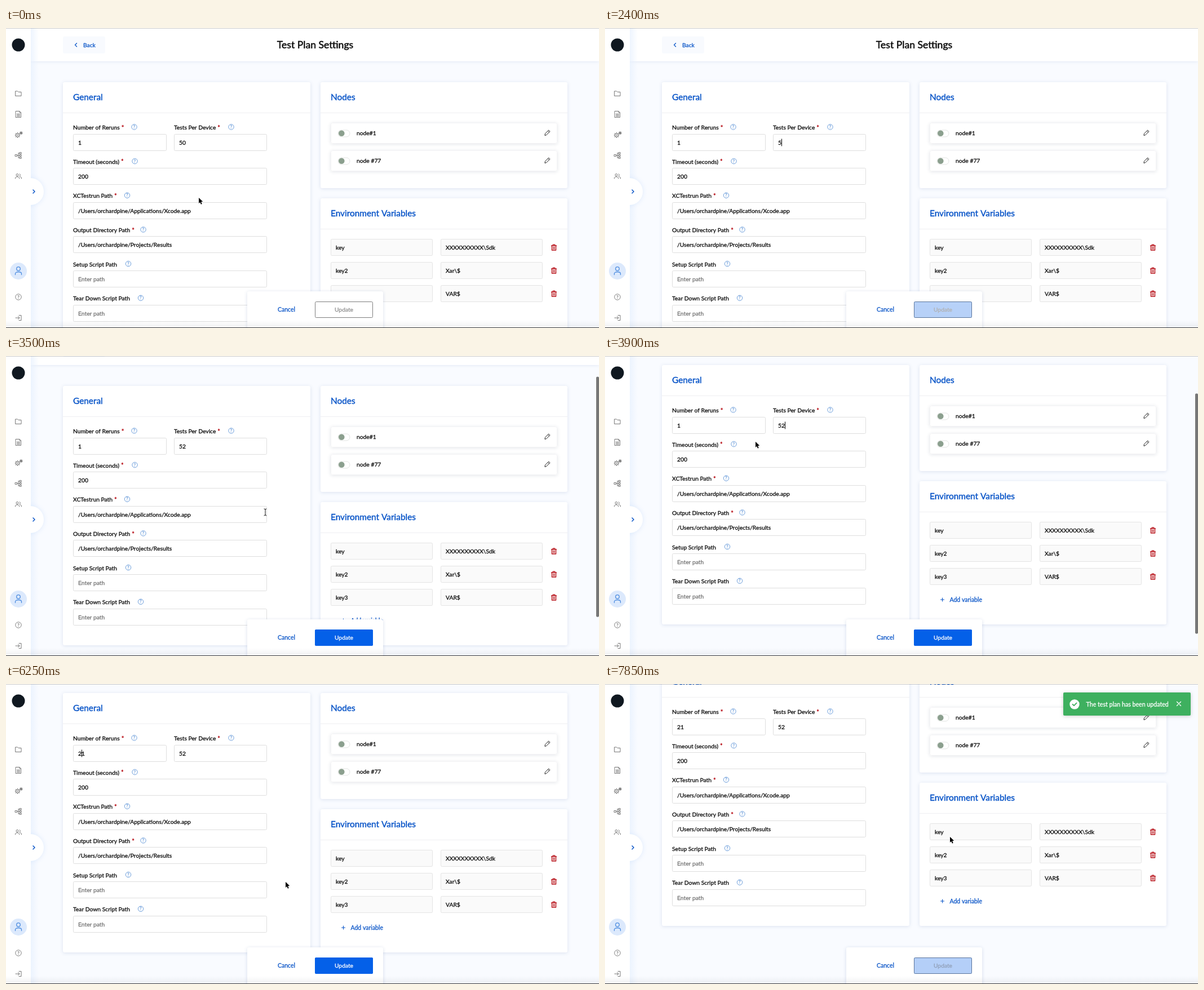
An HTML page with a canvas that plays this animation: 1052 px wide and 532 px high, repeating every 7900 ms.

```html
<!DOCTYPE html>
<html lang="en">
<head>
<meta charset="utf-8">
<title>Test Plan Settings</title>
<style>
  html, body { margin: 0; width: 100%; height: 100%; overflow: hidden; background: #f9fbff; }
  canvas { display: block; width: 1052px; height: 532px; }
</style>
</head>
<body>
<canvas id="stage"></canvas>
<script>
const W = 1052, H = 532, LOOP = 7900;
const canvas = document.getElementById('stage');
const ctx = canvas.getContext('2d');
const dpr = window.devicePixelRatio || 1;
canvas.width = W * dpr;
canvas.height = H * dpr;

const FONT = 'Lato, "Open Sans", sans-serif';
const BLUE = '#0b56c8', INK = '#0c0c0c', RED = '#b8141c', GREY = '#777';
const BODY = 10.3;

const clamp = v => Math.max(0, Math.min(1, v));
const ramp = (t, a, b) => clamp((t - a) / (b - a));
const ease = p => p * p * (3 - 2 * p);
const lerp = (a, b, p) => a + (b - a) * p;
const between = (t, a, b) => t >= a && t < b;

function mix(a, b, p) {
  return `rgb(${a.map((v, i) => Math.round(lerp(v, b[i], p))).join(',')})`;
}

// Drawing helpers
function box(x, y, w, h, r, fill, stroke, shadow) {
  ctx.save();
  ctx.beginPath();
  ctx.roundRect(x, y, w, h, r);
  if (shadow) {
    ctx.shadowColor = shadow;
    ctx.shadowBlur = 6 * dpr;
    ctx.shadowOffsetY = dpr;
  }
  if (fill) { ctx.fillStyle = fill; ctx.fill(); }
  ctx.restore();
  if (stroke) {
    ctx.lineWidth = 1;
    ctx.strokeStyle = stroke;
    ctx.beginPath();
    ctx.roundRect(x + .5, y + .5, w - 1, h - 1, r);
    ctx.stroke();
  }
}

function disc(x, y, r, fill, stroke, width = 1) {
  ctx.beginPath();
  ctx.arc(x, y, r, 0, 7);
  if (fill) { ctx.fillStyle = fill; ctx.fill(); }
  if (stroke) { ctx.lineWidth = width; ctx.strokeStyle = stroke; ctx.stroke(); }
}

// y is the middle of the capitals; a hairline stroke gives a medium weight
function text(s, x, y, color = INK, size = BODY, align = 'left') {
  ctx.font = `${size}px ${FONT}`;
  ctx.textAlign = align;
  ctx.fillStyle = ctx.strokeStyle = color;
  ctx.lineWidth = size * .028;
  ctx.lineJoin = 'round';
  ctx.fillText(s, x, y + size * .34);
  ctx.strokeText(s, x, y + size * .34);
  return ctx.measureText(s).width;
}

function icon(d, x, y, stroke, width = 1, fill) {
  const path = new Path2D(d);
  ctx.save();
  ctx.translate(x, y);
  ctx.lineJoin = ctx.lineCap = 'round';
  if (fill) { ctx.fillStyle = fill; ctx.fill(path); }
  if (stroke) { ctx.strokeStyle = stroke; ctx.lineWidth = width; ctx.stroke(path); }
  ctx.restore();
}

function rule(x, y, w, color) {
  ctx.fillStyle = color;
  ctx.fillRect(x, y, w, 1);
}

const ICONS = {
  folder: 'M-5-4H-1.5L0-2.5H5V4.5H-5Z',
  doc: 'M-4.5-5.5H2L4.5-3V5.5H-4.5ZM2-5.5V-3H4.5M-2.5-.5H2.5M-2.5 1.5H2.5M-2.5 3.5H2.5',
  tree: 'M-5.5-1.5H-2.5V1.5H-5.5ZM-2.5 0H2.5M0-4V4M0-4H2.5M0 4H2.5M2.5-5.3H5.2V-2.8H2.5ZM2.5-1.2H5.2V1.2H2.5ZM2.5 2.8H5.2V5.3H2.5Z',
  people: 'M-5.5 4V3C-5.5.2 1.5.2 1.5 3V4M2.8.7C4.5.9 5.5 1.8 5.5 3V4M2-4.2A2 2 0 0 1 2-.4',
  exit: 'M1-4.5H5V4.5H1M-5 0H2M-.5-2.5L2 0L-.5 2.5',
  user: 'M-5.5 7V5C-5.5 1 5.5 1 5.5 5V7',
  left: 'M1.5-3L-1.5 0L1.5 3',
  right: 'M-1.5-3L1.5 0L-1.5 3',
  pencil: 'M-4.5 4.5L-4 1.7L2.2-4.5L4.5-2.2L-1.7 4ZM.8-3.1L3.1-.8',
  trash: 'M-4.5-3H4.5M-1.8-3V-4.8H1.8V-3M-3.6-3V5H3.6V-3M-1.2-.8V3M1.2-.8V3',
  plus: 'M-3 0H3M0-3V3',
  check: 'M-3.4 0L-1 2.4L3.6-2.3',
  cross: 'M-3.5-3.5L3.5 3.5M3.5-3.5L-3.5 3.5',
  arrow: 'M0 0V10L2.3 7.9L3.9 11.8L5.7 11L4.1 7.3L7.2 7Z',
  beam: 'M-2-6Q0-6 0-4.5Q0-6 2-6M0-4.5V4.5M-2 6Q0 6 0 4.5Q0 6 2 6',
  hand: 'M-1.3-5.5Q-.2-6.4.6-5.5L1.3-1.8L4.5-.9Q5.6-.3 5.2 1.6L4.3 5.8H-.7L-4 1.4Q-4.2-.1-2.6.3L-1 1.5Z'
};

function help(x, y, color, r = 4.7) {
  disc(x, y, r, null, color, .9);
  text('?', x, y, color, r * 1.55, 'center');
}

// Form layout: label, x, row, width, help x, required
const TOP = 176.5, STEP = 60.65;
const FIELDS = [
  ['Number of Reruns', 119, 0, 166, 227.5, true],
  ['Tests Per Device', 298, 0, 165, 399.5, true],
  ['Timeout (seconds)', 119, 1, 344, 228.5, true],
  ['XCTestrun Path', 119, 2, 344, 215, true],
  ['Output Directory Path', 119, 3, 344, 243.5, true],
  ['Setup Script Path', 119, 4, 344, 217, false],
  ['Tear Down Script Path', 119, 5, 344, 239, false]
];
const fieldY = row => Math.floor(TOP + row * STEP + 11.5);

function values(t) {
  const tests = t < 2350 ? '50' : t < 2500 ? '5' : '52';
  return [t < 5200 ? '1' : '21', tests, '200',
    '/Users/orchardpine/Applications/Xcode.app',
    '/Users/orchardpine/Projects/Results', '', ''];
}

// Field index and character position of the visible caret
function caret(t) {
  if (between(t, 850, 1350)) return [2, 3];
  if (between(t, 1500, 2000) || between(t, 2350, 3050) || between(t, 3550, 4050))
    return [1, between(t, 2350, 2500) ? 1 : 2];
  if (between(t, 4400, 4900)) return [0, 0];
  if (between(t, 5200, 5700) || between(t, 6200, 6700)) return [0, 1];
  return null;
}

function scrollAt(t) {
  return Math.round(80 * ease(ramp(t, 3260, 3720)) + 47 * ease(ramp(t, 6300, 6620)));
}

const PATH = [
  [0, 342, 301], [1000, 342, 301], [1150, 359, 222], [1450, 366, 203],
  [2800, 366, 203], [3000, 460, 277], [3600, 460, 277], [3880, 267, 152],
  [4080, 267, 152], [4380, 131, 123], [5600, 131, 123], [5900, 420, 300],
  [6050, 420, 300], [6230, 496, 351], [6640, 496, 351], [6920, 603, 500],
  [7280, 603, 500], [7520, 612, 271]
];

function pointer(t) {
  const i = PATH.findIndex(k => k[0] > t);
  if (i < 0) return PATH[PATH.length - 1].slice(1);
  const a = PATH[i - 1], b = PATH[i], p = ease(ramp(t, a[0], b[0]));
  return [lerp(a[1], b[1], p), lerp(a[2], b[2], p)];
}

const overButton = ([x, y]) => x > 548 && x < 651 && y > 485 && y < 514;

function card(x, y, w, h, title) {
  box(x, y, w, h, 3, '#fff', null, 'rgba(70,100,160,.17)');
  text(title, x + 18, y + 26.6, BLUE, 15.4);
  rule(x, y + 54, w, '#efeff2');
}

function drawHeader() {
  ctx.save();
  ctx.shadowColor = 'rgba(70,100,160,.16)';
  ctx.shadowBlur = 6 * dpr;
  ctx.fillStyle = '#fff';
  ctx.fillRect(0, -10, W, 69);
  ctx.restore();
  box(101, 15, 75, 30, 3, '#f8fafe');
  icon(ICONS.left, 124, 30, BLUE, 1.3);
  text('Back', 137, 30.5, BLUE);
  text('Test Plan Settings', 548.5, 30.3, INK, 17.6, 'center');
}

function drawForm(t) {
  card(101, 96, 439, 460, 'General');
  const vals = values(t), car = caret(t);
  FIELDS.forEach(([label, x, row, w, hx, must], i) => {
    const ly = TOP + row * STEP, y = fieldY(row);
    const lw = text(label, x, ly);
    if (must) text('*', x + lw + 3, ly + .5, RED, 11);
    help(hx, ly - 1, '#5c92d6');
    box(x, y, w, 30, 2, '#fff', '#dedede');
    const mid = y + 15;
    text(vals[i] || 'Enter path', x + 9, mid, vals[i] ? INK : '#757575');
    if (car && car[0] === i) {
      const off = ctx.measureText(vals[i].slice(0, car[1])).width;
      ctx.fillStyle = '#000';
      ctx.fillRect(Math.round(x + 9 + off), mid - 6.5, 1, 13);
    }
  });
}

function drawNodes() {
  card(558, 96, 438, 188, 'Nodes');
  ['node#1', 'node #77'].forEach((name, i) => {
    const y = 168 + i * 49;
    box(576, y, 402, 37, 3, '#fff', '#f3f3f5', 'rgba(60,70,100,.14)');
    box(588.5, y + 12.5, 22, 13, 6, '#fff', '#e2e4e2');
    disc(595.3, y + 18.7, 5.3, '#8b9f8e');
    text(name, 622, y + 18.7);
    icon(ICONS.pencil, 960.5, y + 17.6, '#222', 1);
  });
}

function drawVariables() {
  card(558, 302, 438, 254, 'Environment Variables');
  [['key', 'XXXXXXXXXX\\Sdk'], ['key2', 'Xar\\$'], ['key3', 'VAR$']].forEach((pair, i) => {
    const y = 374 + i * 41;
    pair.forEach((s, j) => {
      const x = 576 + j * 195;
      box(x, y, 181, 30, 2, '#fafafa', '#e4e4e4');
      text(s, x + 9, y + 15.2);
    });
    icon(ICONS.trash, 972, y + 15, RED, 1.3);
  });
  icon(ICONS.plus, 598.5, 512, BLUE, 1.1);
  text('Add variable', 611.5, 512.3, BLUE, 10.5);
}

function gear(x, y, r) {
  disc(x, y, r, null, GREY, 1);
  disc(x, y, r * .35, null, GREY, .8);
  for (let a = 0; a < 8; a++) {
    const c = Math.cos(a * Math.PI / 4), s = Math.sin(a * Math.PI / 4);
    icon(`M${c * r} ${s * r}L${c * (r + 1.2)} ${s * (r + 1.2)}`, x, y, GREY, 1.1);
  }
}

function drawSidebar() {
  const glow = ctx.createLinearGradient(44, 0, 58, 0);
  glow.addColorStop(0, 'rgba(232,241,254,.75)');
  glow.addColorStop(1, 'rgba(232,241,254,0)');
  ctx.fillStyle = glow;
  ctx.fillRect(44, 0, 14, H);
  ctx.save();
  ctx.shadowColor = 'rgba(150,190,245,.28)';
  ctx.shadowBlur = 8 * dpr;
  disc(43, 290, 24, '#fff');
  ctx.restore();
  ctx.fillStyle = '#fff';
  ctx.fillRect(0, 0, 44, H);
  icon(ICONS.right, 49.5, 290, BLUE, 1.5);

  disc(22, 30, 11.5, '#101820');
  icon(ICONS.folder, 22, 116, GREY);
  icon(ICONS.doc, 22, 153, GREY);
  gear(20.5, 190, 3.2);
  gear(26.8, 186.2, 1.2);
  icon(ICONS.tree, 22, 226, GREY);
  icon(ICONS.people, 22, 263, GREY);
  disc(20, 260.6, 2, null, GREY);
  disc(22, 431, 15, '#dce9fc');
  disc(22, 427, 3.3, null, '#4d8de0', 1.3);
  icon(ICONS.user, 22, 430.5, '#4d8de0', 1.3);
  help(22, 477, GREY, 5.2);
  icon(ICONS.exit, 22, 514, GREY);
}

function drawActions(t, hover) {
  box(428, 467, 241, 75, 3, '#fff', null, 'rgba(70,100,160,.2)');
  text('Cancel', 497.5, 499.5, BLUE, 10.5, 'center');
  const on = ease(ramp(t, 2330, 2530));
  const off = .7 * ramp(t, 7700, 7850);
  const white = [255, 255, 255];
  const active = hover ? [3, 78, 208] : [4, 96, 232];
  const live = on * (1 - off);
  box(548, 485, 103, 29, 2, mix(white, active, live),
    mix([125, 125, 125], active, off ? 1 - off : on));
  const ink = off ? mix(white, [145, 160, 185], off / .7) : mix([145, 145, 145], white, on);
  text('Update', 599.5, 499.5, ink, BODY, 'center');
}

function drawScrollbar(t, y) {
  const a = t < 5000
    ? ramp(t, 3310, 3380) * (1 - ramp(t, 4200, 4400))
    : ramp(t, 6290, 6370) * (1 - ramp(t, 7000, 7150));
  if (!a) return;
  ctx.globalAlpha = a;
  box(1047, 2 + y * .807, 5, 426, 2, '#777');
  ctx.globalAlpha = 1;
}

function drawToast(t) {
  const a = ramp(t, 7710, 7840);
  if (!a) return;
  ctx.globalAlpha = a;
  box(813, 15, 226, 41, 2, '#3eb05f', null, 'rgba(0,0,0,.2)');
  disc(833, 36, 8.7, '#fff');
  icon(ICONS.check, 833, 36, '#3eb05f', 1.8);
  text('The test plan has been updated', 853.5, 36.3, '#fff', 10.65);
  icon(ICONS.cross, 1018, 35, '#fff', 1.4);
  ctx.globalAlpha = 1;
}

function drawEdges() {
  const shade = ctx.createLinearGradient(0, 518, 0, H);
  shade.addColorStop(0, 'rgba(60,70,90,0)');
  shade.addColorStop(1, 'rgba(60,70,90,.08)');
  ctx.fillStyle = shade;
  ctx.fillRect(0, 518, W, 14);
  rule(0, 0, W, 'rgba(0,0,0,.2)');
  rule(0, 531, W, 'rgba(0,0,0,.75)');
}

function drawPointer(t, pos, y) {
  if (between(t, 2350, 2800) || between(t, 5200, 5600)) return;
  const [px, py] = pos;
  const inField = FIELDS.some(([, x, row, w]) => {
    const top = fieldY(row) - y;
    return px > x && px < x + w && py > top && py < top + 29;
  });
  if (overButton(pos)) {
    icon(ICONS.hand, px, py, '#111', 1, '#fff');
  } else if (inField) {
    icon(ICONS.beam, px, py, '#fff', 2.2);
    icon(ICONS.beam, px, py, '#111', 1);
  } else {
    icon(ICONS.arrow, px, py, '#fff', 1.8);
    icon(ICONS.arrow, px, py, null, 0, '#000');
  }
}

function draw(t) {
  const y = scrollAt(t), pos = pointer(t);
  ctx.setTransform(dpr, 0, 0, dpr, 0, 0);
  ctx.fillStyle = '#f9fbff';
  ctx.fillRect(0, 0, W, H);
  ctx.save();
  ctx.translate(0, -y);
  drawHeader();
  drawForm(t);
  drawNodes();
  drawVariables();
  ctx.restore();
  drawSidebar();
  drawActions(t, overButton(pos));
  drawScrollbar(t, y);
  drawToast(t);
  drawEdges();
  drawPointer(t, pos, y);
}

const start = performance.now();
function tick() {
  draw((performance.now() - start) % LOOP);
  requestAnimationFrame(tick);
}
tick();
</script>
</body>
</html>
```
